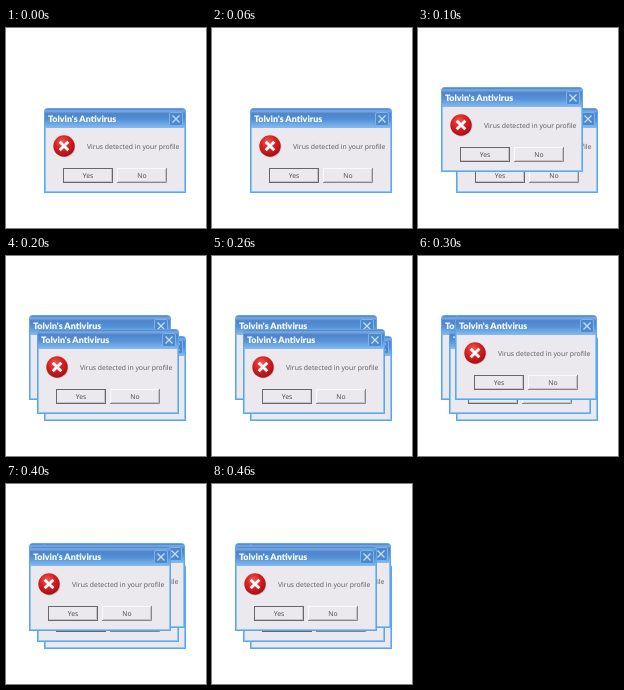
An HTML page for the animation above (0.5 s loop, 200 by 200 pixels).

```html
<!DOCTYPE html>
<html lang="en">
<head>
<meta charset="utf-8">
<title>Popup storm</title>
<style>
  html, body { margin: 0; width: 100%; height: 100%; overflow: hidden; background: #fff; }
  svg { display: block; width: 100vw; height: 100vh; }
  text { font-family: "Noto Sans", "Open Sans", sans-serif; text-rendering: geometricPrecision; }
  .title { font: 900 8.9px Lato, sans-serif; }
</style>
</head>
<body>
<svg viewBox="0 0 200 200">
  <defs>
    <linearGradient id="bar" x2="0" y2="1">
      <stop offset="0" stop-color="#4a80c8"/>
      <stop offset=".1" stop-color="#7fabe2"/>
      <stop offset=".25" stop-color="#4e84ca"/>
      <stop offset=".55" stop-color="#5590d6"/>
      <stop offset="1" stop-color="#84bcf0"/>
    </linearGradient>
    <radialGradient id="ball" cx=".42" cy=".32" r=".7">
      <stop offset="0" stop-color="#ee5c54"/>
      <stop offset=".5" stop-color="#d81f22"/>
      <stop offset="1" stop-color="#a01014"/>
    </radialGradient>
    <g id="button" fill="none">
      <path d="M.5 14.5V.5H49.5" stroke="#fafafb"/>
      <path d="M0 14.5H49.5V0" stroke="#88868c"/>
      <path d="M1 13.5H48.5V1" stroke="#c6c4ca"/>
    </g>
    <g id="dialog">
      <path d="M0 85V4Q0 0 4 0H138Q142 0 142 4V85Z" fill="#5ea6ea"/>
      <path d="M1 20V4Q1 1 4 1H138Q141 1 141 4V20Z" fill="url(#bar)"/>
      <path d="M2 20H140V83H2Z" fill="#ebe9ed"/>
      <path d="M1.5 20V83.5H140.5V20" fill="none" stroke="#8cc6f6"/>
      <text class="title" x="4" y="14.3" fill="#fff">Tolvin's Antivirus</text>

      <rect x="125.5" y="4.5" width="13" height="13" rx="1.5" fill="#4c88d0" stroke="#7db2e8"/>
      <path d="M128.5 7.5l7 7m0-7l-7 7" stroke="#c4def8" stroke-width="1.3"/>

      <circle cx="20.7" cy="38.7" r="10.7" fill="#c8c4c9"/>
      <circle cx="20" cy="38" r="10.7" fill="url(#ball)"/>
      <path d="M15.7 33.7l8.6 8.6m0-8.6l-8.6 8.6" stroke="#fff" stroke-width="2.9"/>
      <text x="43" y="41" font-size="6.8" fill="#606066">Virus detected in your profile</text>

      <use href="#button" x="19" y="60"/>
      <rect x="19.5" y="60.5" width="49" height="14" fill="none" stroke="#68686c"/>
      <use href="#button" x="73" y="60"/>
      <g font-size="6.8" fill="#505056" text-anchor="middle">
        <text x="44" y="70.3">Yes</text>
        <text x="98" y="70.3">No</text>
      </g>
    </g>
  </defs>
  <g id="stack"></g>
</svg>
<script>
const STEP = 100;
const places = [[38, 80], [23, 59], [31, 73], [37, 59], [23, 62]];
const stack = document.getElementById('stack');

stack.innerHTML = places.map(([x, y]) => `<use href="#dialog" x="${x}" y="${y}"/>`).join('');
const dialogs = [...stack.children];

// One more dialog piles up each step, then the stack clears.
function draw() {
  const top = Math.floor(performance.now() / STEP) % places.length;
  dialogs.forEach((dialog, i) => dialog.setAttribute('visibility', i <= top ? 'visible' : 'hidden'));
  requestAnimationFrame(draw);
}
draw();
</script>
</body>
</html>
```
